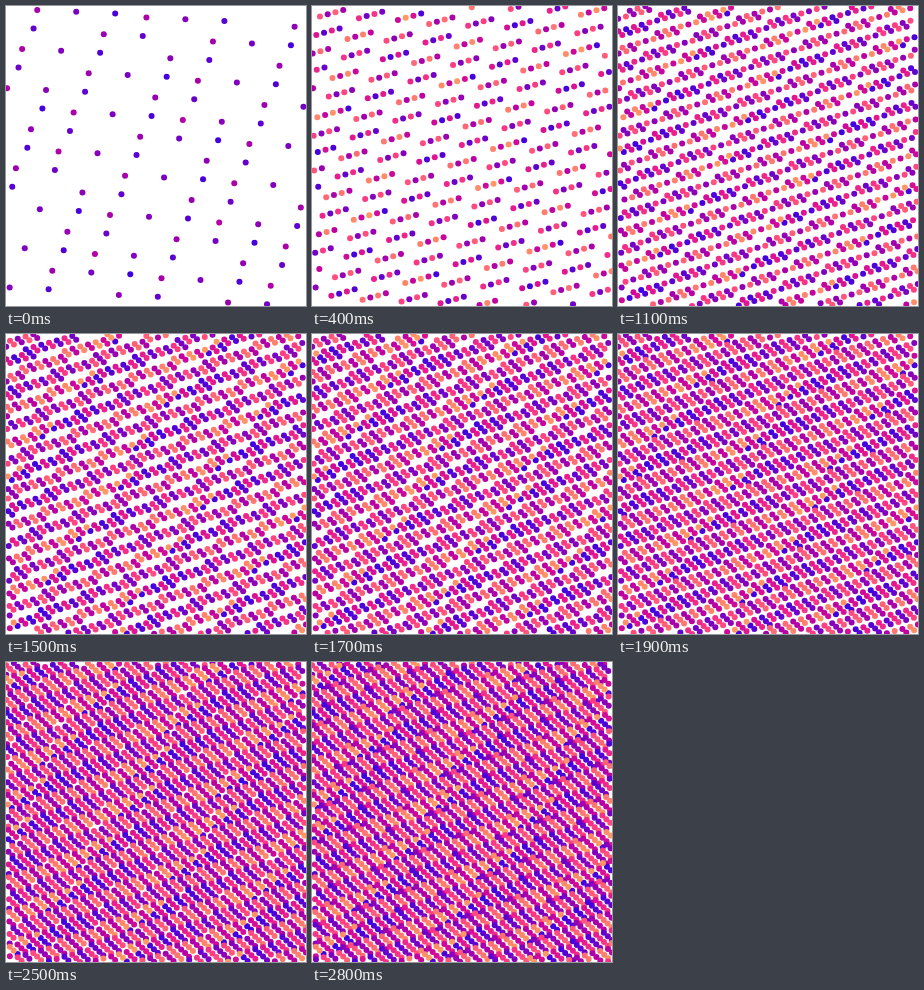
These frames come from a looping animation (300 px wide and 300 px high, 2.9 s). An HTML page with a canvas:

```html
<!DOCTYPE html>
<html>
<head>
<meta charset="utf-8">
<style>
  html, body { margin: 0; height: 100%; overflow: hidden; background: #fff; }
  canvas { display: block; }
</style>
</head>
<body>
<canvas id="stage" width="300" height="300"></canvas>
<script>
const SIZE = 300, RADIUS = 3, STEP_MS = 100, STEPS = 29, DOTS_PER_STEP = 100, CYCLE = 256;
const ctx = document.getElementById('stage').getContext('2d');

// Evenly spaced colour stops from blue through magenta to orange.
const stops = [
  [64, 0, 224], [110, 0, 200], [152, 0, 178], [190, 0, 160],
  [228, 24, 144], [255, 66, 130], [255, 110, 116], [255, 154, 100]
];

function colour(t) {
  const p = t * (stops.length - 1);
  const i = Math.min(Math.floor(p), stops.length - 2);
  const mix = stops[i].map((c, k) => Math.round(c + (stops[i + 1][k] - c) * (p - i)));
  return `rgb(${mix})`;
}

const palette = Array.from({ length: CYCLE }, (_, i) => colour(i / (CYCLE - 1)));
const wrap = v => (v % 1) * SIZE;

// Low-discrepancy lattice: multiples of two irrationals, wrapped to the stage.
function drawDot(n) {
  ctx.fillStyle = palette[n % CYCLE];
  ctx.beginPath();
  ctx.arc(wrap(n * Math.SQRT1_2), wrap(n / Math.sqrt(5)), RADIUS, 0, 2 * Math.PI);
  ctx.fill();
}

let shown = -1;

function render(now) {
  const step = Math.floor(now / STEP_MS) % STEPS;
  if (step !== shown) {
    shown = step;
    ctx.fillStyle = '#fff';
    ctx.fillRect(0, 0, SIZE, SIZE);
    for (let n = 1; n <= (step + 1) * DOTS_PER_STEP; n++) drawDot(n);
  }
}

const start = performance.now();
function tick() {
  render(performance.now() - start);
  requestAnimationFrame(tick);
}
tick();
</script>
</body>
</html>
```
